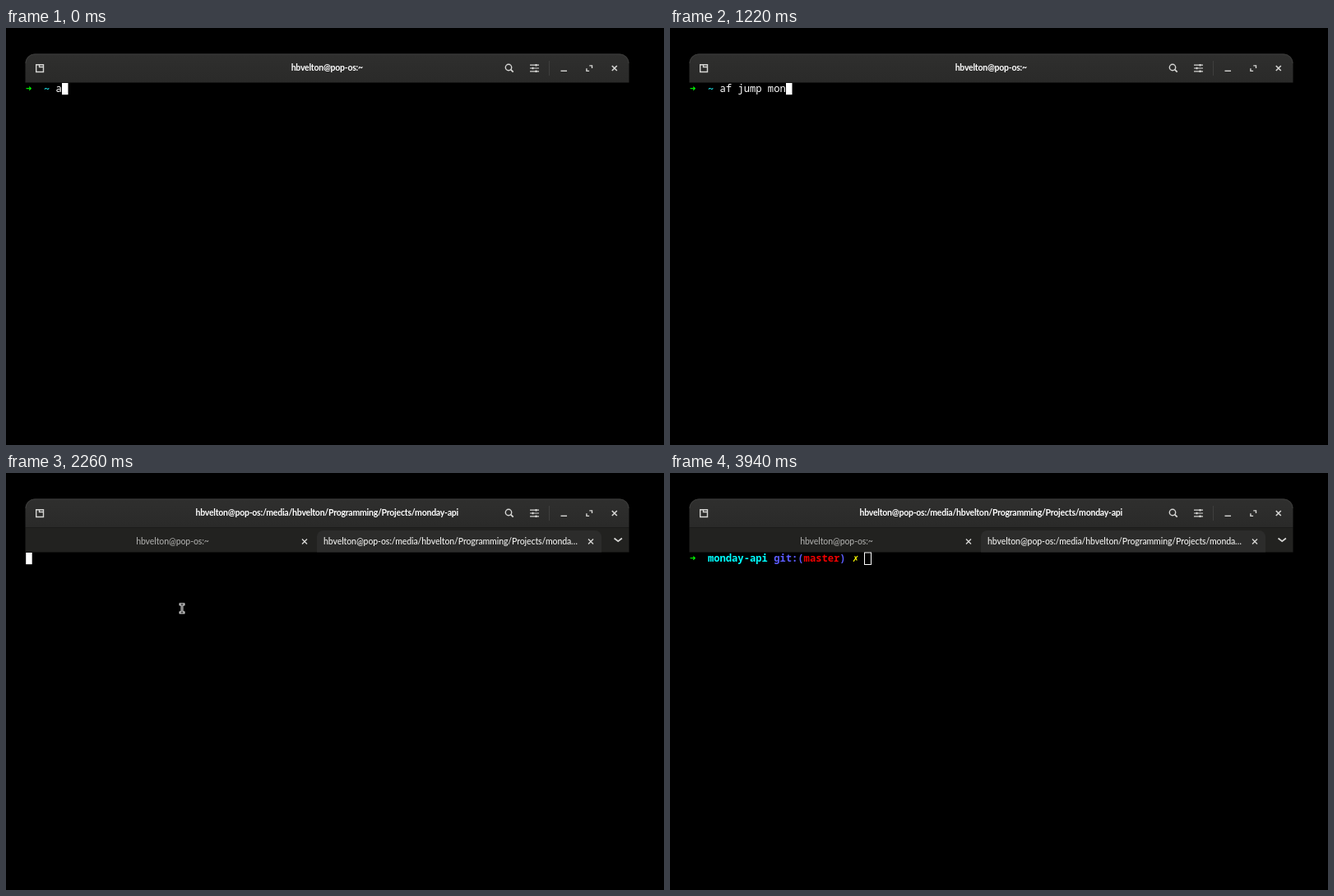
An HTML page that plays this animation: 800x508 px, repeating every 4.34 s.

```html
<!DOCTYPE html>
<html lang="en">
<head>
<meta charset="utf-8">
<title>Terminal jump</title>
<style>
  html, body { margin: 0; width: 100%; height: 100%; overflow: hidden; background: #000; }
  svg { display: block; width: 800px; height: 508px; }
  text { white-space: pre; }
  .ui { font: 500 10.5px Lato, "Noto Sans", sans-serif; letter-spacing: -.1px; text-anchor: middle; }
  .title { font-weight: 700; letter-spacing: -.24px; fill: #fff; }
  .mono { font: 12.17px "Noto Sans Mono", "DejaVu Sans Mono", monospace; fill: #fff; }
  .prompt { font-weight: 600; }
  .symbol { font-family: "DejaVu Sans Mono", "DejaVu Sans", monospace; font-weight: 700; }
  .icon { fill: none; stroke: #d6d6d4; stroke-width: 1.4; }
</style>
</head>
<body>
<svg viewBox="0 0 800 508">
  <defs>
    <linearGradient id="bar" x2="0" y2="1">
      <stop stop-color="#2f2f2e"/><stop offset="1" stop-color="#2a2a29"/>
    </linearGradient>
    <path id="cross" d="M-3-3 3 3M3-3-3 3"/>
  </defs>

  <path d="M23.5 66.5V43a11.5 11.5 0 0 1 11.5-11.5H746A11.5 11.5 0 0 1 757.5 43V66.5Z" fill="url(#bar)"/>
  <path d="M24 43a11 11 0 0 1 11-11H746a11 11 0 0 1 11 11" fill="none" stroke="#3b3b3a"/>
  <text class="ui title" id="title" x="390.3" y="52"></text>
  <g class="icon">
    <path d="M36.7 44.7h8.8v8.8h-8.8zM40.5 44.5v3h5"/>
    <circle cx="611" cy="48" r="3.7"/>
    <path d="M613.7 50.7l3 3" stroke-width="1.8"/>
    <path d="M637 45.2h11M637 49h11M637 52.8h11" stroke-width="1.2"/>
    <path d="M644.5 44v2.4M640.5 47.8v2.4M644.5 51.6v2.4" stroke-width="2"/>
    <path d="M660.5 40v18" stroke="#3f3f3e" stroke-width="1"/>
    <path d="M674.5 52.3h7.5"/>
    <path d="M709.3 45.9h3.2v3.2M705.9 49.2v3.2h3.2"/>
    <use href="#cross" x="739.8" y="49" stroke-width="1.6"/>
  </g>

  <g id="tabs">
    <path d="M23.5 66.5h734v30h-734z" fill="#222220"/>
    <path d="M378 96.5V78a8 8 0 0 1 8-8H716a8 8 0 0 1 8 8V96.5Z" fill="#2c2c2b"/>
    <text class="ui" id="homeTab" x="202.5" y="86.5" fill="#a9a9a7"></text>
    <text class="ui" id="projectTab" x="540.5" y="86.5" fill="#f0f0ee"></text>
    <g class="icon">
      <use href="#cross" x="363" y="83.5"/>
      <use href="#cross" x="711" y="83.5"/>
      <path d="M739.5 79.5l4.7 3.7 4.7-3.7" stroke-width="1.7"/>
    </g>
  </g>

  <g id="homePrompt" class="mono prompt">
    <text class="symbol" x="24" y="78" fill="#0f0">➜</text>
    <text x="45.9" y="78" fill="#1de9f0">~</text>
    <text id="command" x="60.5" y="78" font-weight="400"></text>
  </g>
  <g id="projectPrompt" class="mono prompt">
    <text class="symbol" x="24" y="108" fill="#0f0">➜</text>
    <text x="45.9" y="108" fill="#0ff">monday-api <tspan fill="#5c5cff">git:(</tspan><tspan fill="#f00000">master</tspan><tspan fill="#5c5cff">)</tspan></text>
    <text class="symbol" x="222" y="108" fill="#ff0" style="font-weight:400">✗</text>
  </g>
  <rect id="cursor" width="7.5" height="14.2" fill="#fff"/>
  <rect id="hollowCursor" x="236.5" y="97" width="8" height="14.5" fill="none" stroke="#fff"/>

  <g id="beam" fill="none" stroke-linecap="square">
    <path d="M-2-5H2M0-5V5M-2 5H2" stroke="#fff" stroke-width="2.8"/>
    <path d="M-2-5H2M0-5V5M-2 5H2" stroke="#000" stroke-width=".9"/>
  </g>
  <path id="arrow" d="M0 0V12l3-2.7 2 4.2 2-.9-2-4.1H9Z" stroke="#fff"/>
</svg>
<script>
const LOOP = 4340;
const COLUMN = 7.3;
const COMMAND = "af jump monday-api";
const KEY_TIMES = [0, 120, 220, 300, 400, 580, 720, 860, 1020, 1100, 1200, 1280, 1380, 1460,
                   1660, 1700, 1820, 1920];
const HOST = "hbvelton@pop-os:";
const PROJECT = HOST + "/media/hbvelton/Programming/Projects/monday-api";
const ENTER = 2100, RUNNING = 2180, TABS = 2220, PROMPT = 2360;
const MOVE_START = 3040, MOVE_TIME = 440, POINTER_GONE = 3500, UNFOCUSED = 3940;
const BLINK_START = 2520, BLINK = 300;

const el = id => document.getElementById(id);
const show = (id, on) => el(id).setAttribute("visibility", on ? "visible" : "hidden");
const setText = (id, value) => {
  if (el(id).textContent !== value) el(id).textContent = value;
};
const place = (id, x, y) => el(id).setAttribute("transform", `translate(${x} ${y})`);

function drawCursor(t, typed) {
  let column = 0, y = 67;
  if (t < ENTER) column = 5 + typed;
  else if (t < TABS) y = 81.2;
  else {
    y = 97;
    if (t >= PROMPT) column = 29;
  }
  const blinkOff = t >= BLINK_START && Math.floor((t - BLINK_START) / BLINK) % 2 === 0;
  place("cursor", 24.2 + column * COLUMN, y);
  show("cursor", !blinkOff && t < UNFOCUSED);
  show("hollowCursor", t >= UNFOCUSED);
}

// A shallow dip to the right, then a climb to the window buttons.
function drawPointer(t) {
  const step = Math.floor(t / 20) * 20;
  const p = Math.min(1, Math.max(0, (step - MOVE_START) / MOVE_TIME));
  const s = p * p * (3 - 2 * p);
  const turn = .64;
  const x = 214 + 487 * s;
  const y = s < turn
    ? 165 + 32 * Math.sin(s / turn * Math.PI / 2)
    : 197 - 156 * ((s - turn) / (1 - turn)) ** 2;
  const visible = t >= RUNNING && t < POINTER_GONE;
  place("beam", x, y);
  place("arrow", x, y);
  show("beam", visible && y >= 97);
  show("arrow", visible && y < 97);
}

function draw() {
  const t = performance.now() % LOOP;
  const typed = KEY_TIMES.filter(time => time <= t).length;
  const tabbed = t >= TABS;
  setText("command", COMMAND.slice(0, typed));
  setText("title", tabbed ? PROJECT : t >= RUNNING ? COMMAND : HOST + "~");
  show("homePrompt", !tabbed);
  show("tabs", tabbed);
  show("projectPrompt", t >= PROMPT);
  drawCursor(t, typed);
  drawPointer(t);
  requestAnimationFrame(draw);
}

setText("homeTab", HOST + "~");
setText("projectTab", PROJECT.slice(0, -5) + "…");
draw();
</script>
</body>
</html>
```
